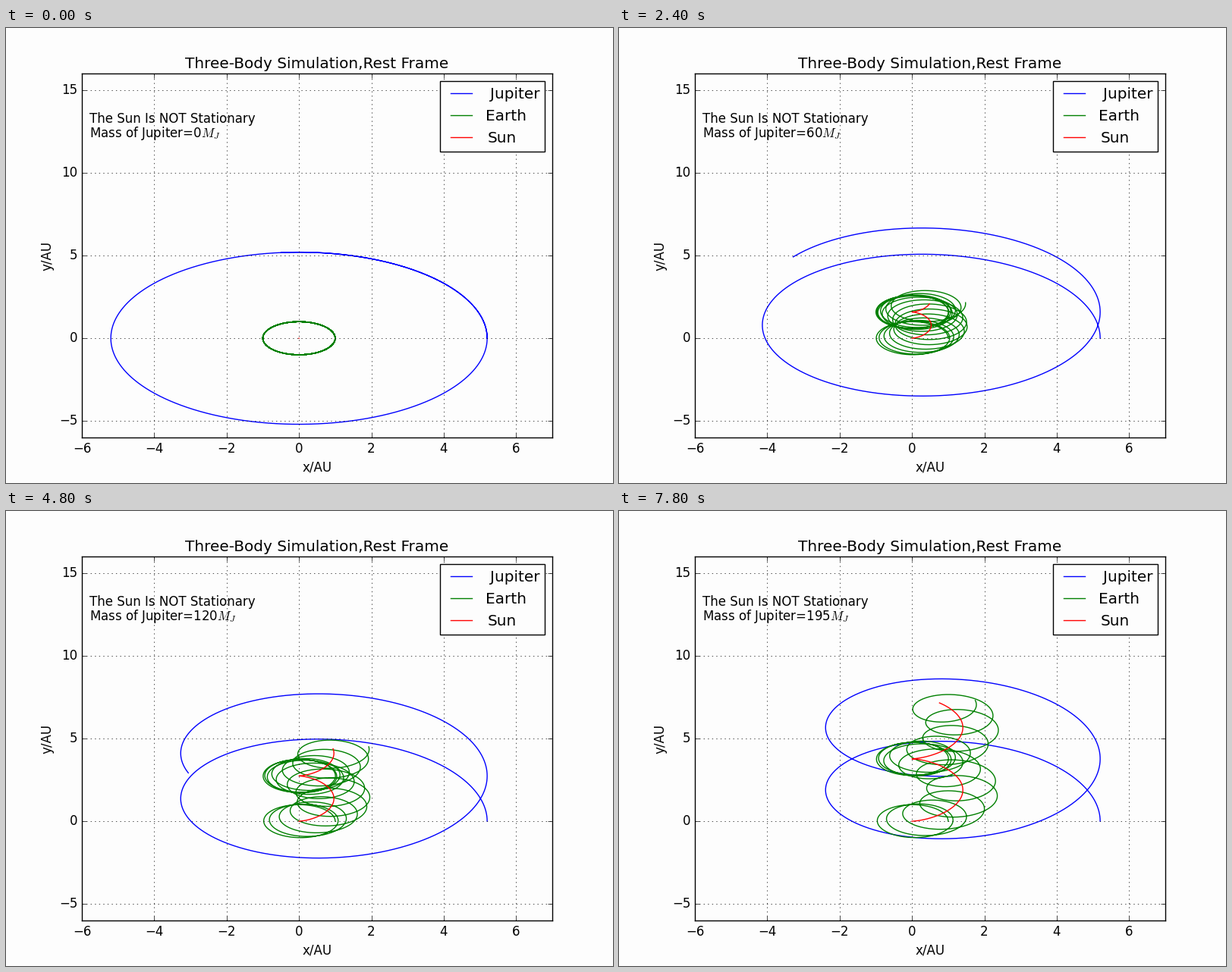
A matplotlib script for the animation above (8 s loop, 800 by 600 pixels).

```python
import numpy as np
import matplotlib.pyplot as plt
from matplotlib.animation import FuncAnimation

plt.style.use("classic")
PAPER = "#fdfdfd"
plt.rcParams.update({
    "font.family": "DejaVu Sans",
    "figure.facecolor": PAPER,
    "savefig.facecolor": PAPER,
    "axes.facecolor": PAPER,
})

FRAMES, INTERVAL = 40, 200
MASS_STEP = 5            # Jupiter masses added per frame
YEARS, DT, KEEP = 15, 0.002, 3
GM = 4 * np.pi ** 2      # AU^3 / yr^2 for one solar mass
M_JUP, M_EARTH = 9.5e-4, 3e-6
R_JUP, R_EARTH = 5.2, 1.0


def accelerate(pos, mass):
    """Mutual gravity; pos has shape (body, run, axis)."""
    acc = np.zeros_like(pos)
    for i, j in ((0, 1), (0, 2), (1, 2)):
        d = pos[j] - pos[i]
        pull = GM * d / (d ** 2).sum(axis=1, keepdims=True) ** 1.5
        acc[i] += mass[j] * pull
        acc[j] -= mass[i] * pull
    return acc


def simulate():
    """Leapfrog all runs at once; returns (time, body, run, axis)."""
    mass = np.ones((3, FRAMES, 1))
    mass[0, :, 0] = M_JUP * MASS_STEP * np.arange(FRAMES)
    mass[1] = M_EARTH
    pos = np.zeros((3, FRAMES, 2))
    vel = np.zeros_like(pos)
    for body, r in enumerate((R_JUP, R_EARTH)):
        pos[body, :, 0] = r
        vel[body, :, 1] = np.sqrt(GM / r)

    track = [pos.copy()]
    acc = accelerate(pos, mass)
    for step in range(1, round(YEARS / DT) + 1):
        vel += acc * DT / 2
        pos += vel * DT
        acc = accelerate(pos, mass)
        vel += acc * DT / 2
        if step % KEEP == 0:
            track.append(pos.copy())
    return np.array(track)


track = simulate()

fig = plt.figure(figsize=(8, 6), dpi=100)
ax = fig.add_axes([0.125, 0.1, 0.775, 0.8])
lines = [ax.plot([], [], color, label=name)[0]
         for color, name in (("b", "Jupiter"), ("g", "Earth"), ("r", "Sun"))]
ax.set_xlim(-6, 7)
ax.set_ylim(-6, 16)
ax.set_xticks(range(-6, 7, 2))
ax.set_yticks(range(-5, 16, 5))
ax.grid(True)
ax.set_xlabel("x/AU")
ax.set_ylabel("y/AU")
ax.set_title("Three-Body Simulation,Rest Frame")

legend = ax.legend(loc="upper right")
for label, shift in zip(legend.get_texts(), (2, -4, -2)):
    label.set_x(shift)

ax.text(-5.8, 13.02, "The Sun Is NOT Stationary")
mass_text = ax.text(-5.8, 12.15, "")


def draw(frame):
    for body, line in enumerate(lines):
        line.set_data(track[:, body, frame, 0], track[:, body, frame, 1])
    mass_text.set_text(f"Mass of Jupiter={MASS_STEP * frame}$M_J$")
    return [*lines, mass_text]


anim = FuncAnimation(fig, draw, frames=FRAMES, interval=INTERVAL,
                     repeat=True, repeat_delay=0)
plt.show()
```
